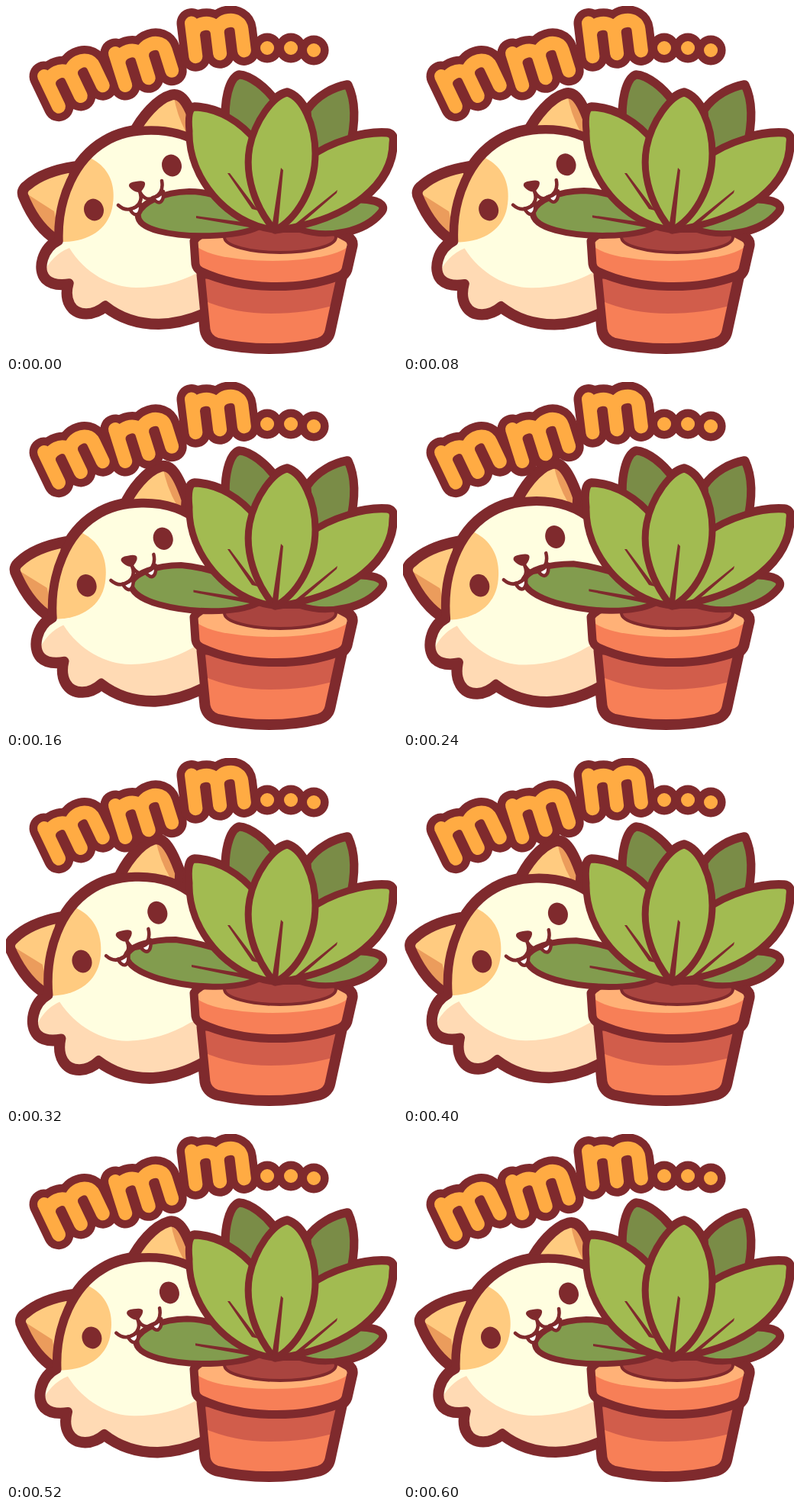
Write an HTML page that moves like this. It is 512 px wide and 456 px high and loops after 0.64 s.

```html
<!DOCTYPE html>
<html lang="en">
<head>
<meta charset="utf-8">
<title>mmm...</title>
<style>
  html, body { margin: 0; width: 100%; height: 100%; overflow: hidden; background: #fff; }
  svg { display: block; width: 512px; height: 456px; }
  .line { stroke: #7f2a2d; stroke-linecap: round; stroke-linejoin: round; }
  .ink { fill: #7f2a2d; }
  .none { fill: none; }
  .cream { fill: #fffee0; }
  .peach { fill: #ffdab4; }
  .tan { fill: #ffcb80; }
  .tanDark { fill: #eb9c5c; }
  .olive { fill: #7a8c47; }
  .moss { fill: #829c4e; }
  .leaf { fill: #a2bb51; }
  .clay { fill: #f77f57; }
  .clayDark { fill: #d15d4b; }
  .clayLight { fill: #ffb177; }
  .soil { fill: #a9443f; }
  .letters { fill: none; stroke-linecap: round; stroke-linejoin: round; }
</style>
</head>
<body>
<svg viewBox="0 0 512 456" role="img" aria-label="mmm...">
  <defs>
    <path id="m" d="M0 44V0M0 16C2 -2 32 -2 32 16V44M32 16C34 -2 64 -2 64 16V44"/>
    <g id="word">
      <use href="#m" transform="translate(50 92) rotate(-25.5)"/>
      <use href="#m" transform="translate(143 62) rotate(-17.5)"/>
      <use href="#m" transform="translate(243 22.500) rotate(-7)"/>
      <path d="M342 55h.1M373 55h.1M403 58h.1"/>
    </g>
    <path id="body" d="M300 270C300 200 250 163 190 163C165 163 145 169 130 178C92 200 67 250 69 308C49 318 42 345 53 357Q62 366 83 363C77 385 86 402 105 402Q118 402 130 392C150 408 175 415.500 200 415.500C225 415 255 408 290 385Z"/>
    <clipPath id="inBody"><use href="#body"/></clipPath>
    <path id="earL" d="M90 212Q50 218 29 236Q20 242 25 251C35 275 50 295 68 306Z"/>
    <clipPath id="inEarL"><use href="#earL"/></clipPath>
    <path id="earR" d="M168 168C179 146 199 123 217 118Q224 116 230 122Q239 131 248 160L246 180Z"/>
    <clipPath id="inEarR"><use href="#earR"/></clipPath>

    <path id="pot" d="M255 352L262 424Q264 436 276 440C320 450 370 450 410 440Q421 436 423 426L439 352Z"/>
    <clipPath id="inPot"><use href="#pot"/></clipPath>
    <path id="rim" d="M246 308L248 338Q249 345 256 348C310 373 385 373 436 354Q443 351 445 345L452 314Q453 308 447 304C425 290 395 284 347 284C300 284 256 292 246 308Z"/>
    <clipPath id="inRim"><use href="#rim"/></clipPath>

    <g id="backLeaves">
      <path d="M289 155C286 125 293 96 305 91C320 92 340 108 352 125L330 200Z"/>
      <path d="M395 137C408 118 430 107 447 104C457 125 457 152 449 185L400 210Z"/>
    </g>
    <path id="sideLeaf" d="M352 293C400 262 452 248 483 257Q498 262 489 271C470 293 425 306 385 293Z"/>
    <g id="frontLeaves">
      <path d="M350 293C290 285 238 225 240 164Q237 134 247 133C278 134 308 152 328 178L350 240Z"/>
      <path d="M395 200C425 177 470 165 499 167Q508 168 506 179C506 230 455 280 353 294Z"/>
      <path d="M352 294C326 264 312 222 319 185C326 150 350 118 368 114C388 120 405 155 405 193C405 238 382 278 352 294Z"/>
    </g>
  </defs>

  <!-- heavier outer contour behind everything -->
  <g class="line none" stroke-width="17">
    <use href="#pot"/>
    <use href="#rim"/>
    <g stroke-width="13.500">
      <use href="#backLeaves"/>
      <use href="#sideLeaf"/>
      <use href="#frontLeaves"/>
    </g>
    <g class="cat">
      <use href="#earL"/>
      <use href="#earR"/>
      <use href="#body"/>
    </g>
  </g>

  <g class="letters">
    <use href="#word" stroke="#7f2a2d" stroke-width="39"/>
    <use href="#word" stroke="#ffab43" stroke-width="18"/>
  </g>

  <g class="cat">
    <use href="#earL" class="tan"/>
    <path class="tanDark" clip-path="url(#inEarL)" d="M24 244L63 269L72 310L20 310Z"/>
    <use href="#earL" class="line none" stroke-width="11"/>
    <use href="#earR" class="tan"/>
    <path class="tanDark" clip-path="url(#inEarR)" d="M219 112Q222 140 236 166L250 190V112Z"/>
    <use href="#earR" class="line none" stroke-width="11"/>
    <use href="#body" class="cream"/>
    <g clip-path="url(#inBody)">
      <path class="tan" d="M60 309H77C108 308 133 293 139 265C145 235 135 212 112 200L60 180Z"/>
      <path class="peach" d="M48 352Q60 326 83 317C103 350 138 369 170 369C200 369 225 363 252 349L300 330V430H40Z"/>
    </g>
    <use href="#body" class="line none" stroke-width="11.500"/>
    <g class="ink">
      <ellipse cx="115" cy="267" rx="12.800" ry="14.500" transform="rotate(-18 115 267)"/>
      <ellipse cx="217" cy="209" rx="12.800" ry="14.500" transform="rotate(-18 217 209)"/>
    </g>
  </g>

  <use href="#backLeaves" class="line olive" stroke-width="9"/>

  <use href="#pot" class="clayDark"/>
  <path class="clay" clip-path="url(#inPot)" d="M250 382C285 398 315 403 347 403C380 403 410 399 445 388V456H250Z"/>
  <use href="#pot" class="line none" stroke-width="11"/>
  <use href="#rim" class="clay"/>
  <g clip-path="url(#inRim)">
    <ellipse class="clayLight" cx="349" cy="308" rx="103" ry="26"/>
    <ellipse class="soil line" stroke-width="4" cx="359" cy="303" rx="73" ry="20"/>
  </g>
  <use href="#rim" class="line none" stroke-width="11"/>

  <use href="#sideLeaf" class="line moss" stroke-width="8"/>
  <path class="moss line bitten" stroke-width="8"/>
  <path class="ink vein"/>
  <use href="#frontLeaves" class="line leaf" stroke-width="9"/>
  <path class="ink" d="M360 212L363 215L356 291H348ZM290 219L293 219L330 268L322 266ZM434 241L433 245L386 286L377 287Z"/>

  <g class="cat">
    <path class="ink" d="M161 236Q160 231 170 230Q181 228 182 232Q183 236 177 243Q174 245 169 243Q163 240 161 236Z"/>
    <g class="line" stroke-width="4.500">
      <path fill="#fff" d="M162 266Q167 275 172 273Q177 270 176 259Q170 265 162 266Z"/>
      <path fill="#fff" d="M192 251Q198 259 202 257Q207 254 206 243Q200 250 192 251Z"/>
      <path class="none" d="M147 261Q158 271 170 263Q180 256 175 243Q182 257 194 251Q207 245 204 229"/>
    </g>
  </g>
</svg>
<script>
  const LOOP = 640, STEP = 40;
  const RISE = 285, TURN = 298, REST = 600;
  const $ = s => document.querySelector(s);
  const cat = document.querySelectorAll(".cat");
  const bitten = $(".bitten"), vein = $(".vein");

  // Left part of the chewed leaf: at rest and fully pulled.
  const leafRest = [235, 304, 200, 295, 185, 291, 171, 284, 173, 272, 179, 257, 205, 244, 240, 243];
  const leafPull = [245, 302, 200, 289, 180, 283, 160, 273, 157, 260, 161, 245, 190, 238, 222, 238];

  const ease = u => (1 - Math.cos(Math.PI * Math.min(1, Math.max(0, u)))) / 2;
  const mix = (a, b, k) => a + (b - a) * k;

  function pull(t) {
    return t < TURN ? ease(t / RISE) : 1 - ease((t - TURN) / (REST - TURN));
  }

  function draw(now) {
    const t = Math.floor((now % LOOP) / STEP) * STEP;
    const k = pull(t);
    const tilt = [1, -0.035 * k, 0.055 * k, 1 + 0.04 * k, -30.4 * k, -7.13 * k];
    cat.forEach(g => g.setAttribute("transform", `matrix(${tilt})`));

    const p = leafRest.map((v, i) => mix(v, leafPull[i], k));
    bitten.setAttribute("d",
      `M330 290C300 304 ${p.slice(0, 4)}C${p.slice(4, 10)}C${p.slice(10)}C${mix(270, 260, k)} 243 300 255 340 280Z`);
    const x = mix(249, 243, k), y = mix(275, 271, k);
    vein.setAttribute("d", `M${x} ${y}L${x} ${y + 3}L324 291L332 286Z`);
  }

  function tick(now) {
    draw(now);
    requestAnimationFrame(tick);
  }
  draw(0);
  requestAnimationFrame(tick);
</script>
</body>
</html>
```
